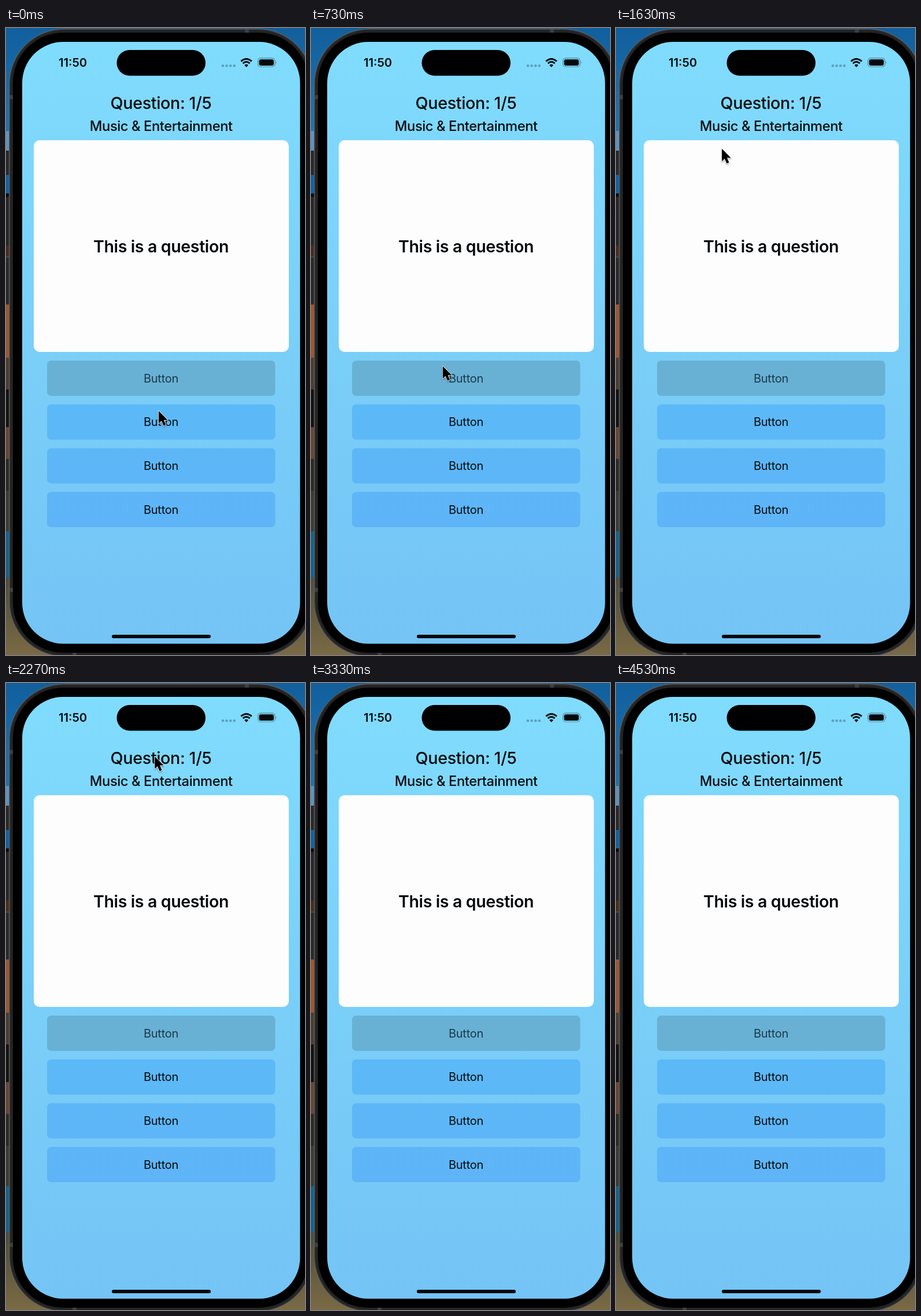
Write an HTML page that moves like this. It is 517 px wide and 1084 px high and loops after 4560 ms.

```html
<!DOCTYPE html>
<html lang="en">
<head>
<meta charset="utf-8">
<title>Quiz screen</title>
<style>
  html, body { margin: 0; width: 100%; height: 100%; overflow: hidden; background: #000; }
  svg { display: block; width: 517px; height: 1084px; }
  text { font-family: Inter, "Liberation Sans", sans-serif; text-anchor: middle; fill: #050a0d; }
  .title { font-size: 28.7px; font-weight: 500; letter-spacing: -.35px; }
  .topic { font-size: 23.7px; font-weight: 500; letter-spacing: -.4px; }
  .question { font-size: 28.6px; font-weight: 600; letter-spacing: -.4px; }
  .label { font-size: 20px; letter-spacing: -.25px; }
  .clock { font-size: 20.2px; font-weight: 600; }
</style>
</head>
<body>
<svg viewBox="0 0 517 1084">
  <defs>
    <linearGradient id="sky" x2="0" y2="1">
      <stop offset="0" stop-color="#80dcfd"/>
      <stop offset=".5" stop-color="#7acff8"/>
      <stop offset="1" stop-color="#74c4f5"/>
    </linearGradient>
    <linearGradient id="button" gradientUnits="userSpaceOnUse" x1="0" y1="650" x2="0" y2="863">
      <stop offset="0" stop-color="#5cb9f7"/>
      <stop offset="1" stop-color="#5eb4f7"/>
    </linearGradient>
    <linearGradient id="sea" x2="0" y2="1">
      <stop offset="0" stop-color="#125f9c"/>
      <stop offset="1" stop-color="#1c76b8"/>
    </linearGradient>
    <linearGradient id="ground" x2="0" y2="1">
      <stop offset="0" stop-color="#4b4a38"/>
      <stop offset="1" stop-color="#7a6a45"/>
    </linearGradient>
    <filter id="shadow" x="-50%" y="-50%" width="200%" height="200%">
      <feDropShadow dx="0" dy="1.5" stdDeviation="1.2" flood-opacity=".4"/>
    </filter>
  </defs>

  <g id="desktop">
    <rect width="517" height="190" fill="url(#sea)"/>
    <rect y="940" width="517" height="144" fill="url(#ground)"/>
  </g>

  <g id="phone">
    <rect x="5.5" y="1.5" width="525" height="1085" rx="95" fill="#303031" stroke="#68696b"/>
    <rect x="8" y="4" width="520" height="1080" rx="92" fill="#232324"/>
    <g fill="#3f4041">
      <rect x="413" y="2" width="7" height="7"/>
      <rect x="6" y="116" width="6" height="7"/>
      <rect x="6" y="968" width="6" height="7"/>
      <rect x="115" y="1079" width="7" height="5"/>
    </g>
    <rect x="12" y="8" width="512" height="1072" rx="87" fill="#000"/>
    <rect x="28" y="24" width="480.5" height="1040.5" rx="71" fill="url(#sky)"/>
  </g>

  <g id="status">
    <text class="clock" x="115.5" y="67.3">11:50</text>
    <rect x="191.5" y="38" width="153.5" height="44.5" rx="22.25"/>
    <g fill="#609fba">
      <circle cx="375" cy="65.3" r="2.3"/><circle cx="381.6" cy="65.3" r="2.3"/>
      <circle cx="388.2" cy="65.3" r="2.3"/><circle cx="394.8" cy="65.3" r="2.3"/>
    </g>
    <g fill="none" stroke="#06090b" stroke-width="2.9">
      <path d="M406.4 57.6Q415.6 49.2 424.8 57.6"/>
      <path d="M409.7 61.2Q415.6 56 421.5 61.2"/>
    </g>
    <path d="M412.2 64.2Q415.6 61.4 419 64.2L415.6 67.8Z" fill="#06090b"/>
    <rect x="435.6" y="52.2" width="29.4" height="14.8" rx="4.6" fill="none" stroke="#4f8498" stroke-width="1.2"/>
    <rect x="437.6" y="54.2" width="25.4" height="10.8" rx="3" fill="#06090b"/>
    <path d="M466.6 57.2Q468.6 59.6 466.6 62Z" fill="#4f8498"/>
  </g>

  <text class="title" x="268" y="139.5">Question: 1/5</text>
  <text class="topic" x="268.3" y="178">Music &amp; Entertainment</text>
  <rect x="48" y="194" width="441" height="366" rx="10" fill="#fdfdfd"/>
  <text class="question" x="268" y="387.5">This is a question</text>
  <g id="buttons"></g>
  <rect x="183" y="1049" width="171" height="6" rx="3" fill="#03070a"/>

  <g id="cursor">
    <path d="M0 0V21.6L4.8 17.1L8.4 25.5L12.4 23.8L8.9 15.6H15.6Z"
      stroke="#fff" stroke-width="1.5" stroke-linejoin="round" paint-order="stroke" filter="url(#shadow)"/>
  </g>
</svg>
<script>
const LOOP = 4560;
const HIDE_AT = 3040;
const svgNS = "http://www.w3.org/2000/svg";
const byId = id => document.getElementById(id);

function add(parent, tag, attrs, content = "") {
  const node = document.createElementNS(svgNS, tag);
  for (const [key, value] of Object.entries(attrs)) node.setAttribute(key, value);
  node.textContent = content;
  parent.append(node);
}

// Slices of wallpaper and windows visible left of the phone: [top, bottom, colour]
const slices = [
  [178, 212, "#5b94c2"], [212, 254, "#29292b"], [254, 286, "#0864ac"],
  [286, 292, "#08090b"], [292, 376, "#272729"], [376, 395, "#4a2c1a"],
  [395, 397, "#48484a"], [397, 478, "#29292b"], [478, 570, "#a0562c"],
  [570, 625, "#4b3d30"], [625, 690, "#15130f"], [690, 745, "#6b4530"],
  [745, 800, "#2c2a24"], [800, 870, "#3b3c36"], [870, 950, "#0d6592"]
];
for (const [top, bottom, fill] of slices)
  add(byId("desktop"), "rect", { y: top, width: 14, height: bottom - top, fill });

for (let i = 0; i < 4; i++) {
  const y = 575 + i * 75.7;
  const disabled = i === 0;
  add(byId("buttons"), "rect", {
    x: 71, y, width: 394.5, height: 61, rx: 7, fill: disabled ? "#68b1d5" : "url(#button)"
  });
  add(byId("buttons"), "text", {
    class: "label", x: 268, y: y + 37.7, style: disabled ? "fill:#1d3a49" : ""
  }, "Button");
}

// Pointer path: [ms, x, y]
const path = [
  [0, 264, 662], [430, 268, 711], [1130, 173, 376], [1630, 183, 209],
  [2270, 257, 127], [2700, 400, 150], [HIDE_AT, 522, 215]
];

function slope(i, axis) {
  const before = path[Math.max(i - 1, 0)];
  const after = path[Math.min(i + 1, path.length - 1)];
  return (after[axis] - before[axis]) / (after[0] - before[0]);
}

function position(t, axis) {
  const i = path.findIndex((p, k) => k < path.length - 1 && t < path[k + 1][0]);
  const a = path[i], b = path[i + 1];
  const span = b[0] - a[0], u = (t - a[0]) / span, v = 1 - u;
  return v * v * (1 + 2 * u) * a[axis] + u * u * (3 - 2 * u) * b[axis]
    + span * u * v * (v * slope(i, axis) - u * slope(i + 1, axis));
}

const cursor = byId("cursor");
function draw(t) {
  const visible = t < HIDE_AT;
  cursor.setAttribute("visibility", visible ? "visible" : "hidden");
  if (visible) cursor.setAttribute("transform", `translate(${position(t, 1)} ${position(t, 2)})`);
}

const start = performance.now();
function tick() {
  draw((performance.now() - start) % LOOP);
  requestAnimationFrame(tick);
}
tick();
</script>
</body>
</html>
```
